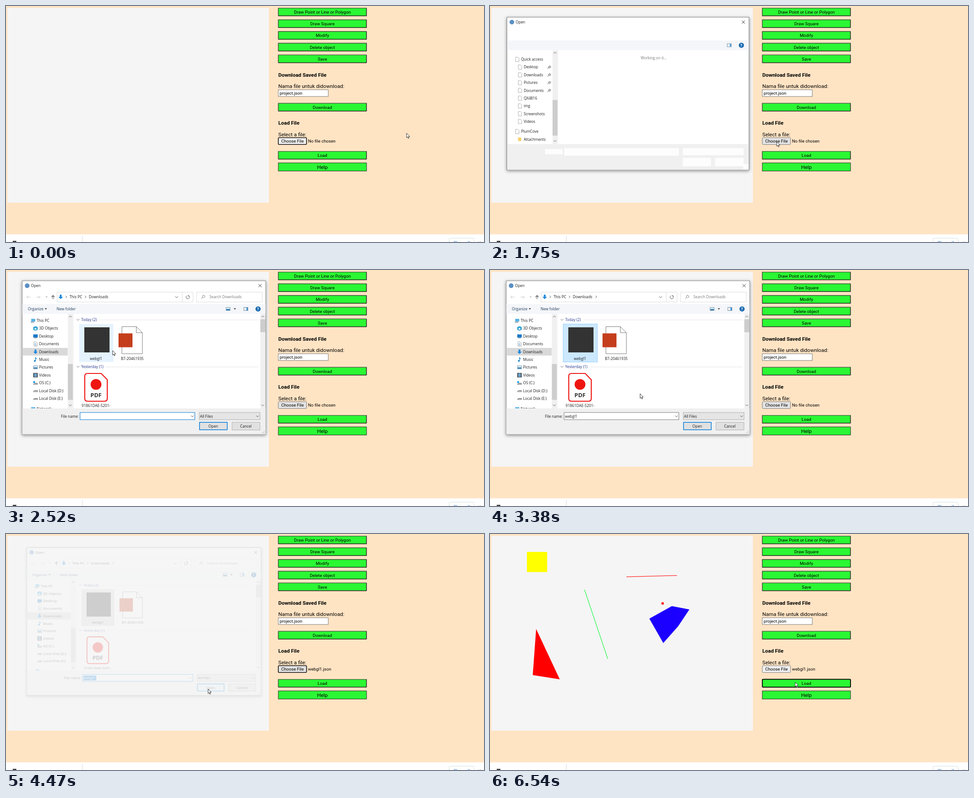
Recreate the animation shown at these times as an HTML page. Size 1062 by 527 pixels, loop 6.77 s.

```html
<!DOCTYPE html>
<html lang="en">
<head>
<meta charset="utf-8">
<title>Load a saved drawing</title>
<style>
  html, body { margin: 0; width: 100%; height: 100%; overflow: hidden; background: #ffe4c4; }
  svg { display: block; width: 1062px; height: 527px; }
  text { font: 9.64px Roboto, sans-serif; white-space: pre; }
  .big { font-size: 11.6px; }
  .head { font-size: 11.5px; font-weight: 700; }
  #dialog text { font: 8.3px "Open Sans", sans-serif; fill: #1c1c1c; }
  #dialog .group { fill: #1e3287; }
  #dialog .tool { fill: #1e395b; }
  #dialog .dim { fill: #777; }
  #dialog .pdf { font-size: 13px; font-weight: 700; fill: #333; }
  #dialog .help { font-size: 9px; font-weight: 700; fill: #fff; }
  .mid { text-anchor: middle; }
</style>
</head>
<body>
<svg id="stage" viewBox="0 0 1062 527"></svg>
<script>
const LOOP = 6770;
const rect = (x, y, w, h, fill, extra = '') =>
  `<rect x="${x}" y="${y}" width="${w}" height="${h}" fill="${fill}" ${extra}/>`;
const box = (x, y, w, h, fill, stroke, extra = '') =>
  rect(x + .5, y + .5, w - 1, h - 1, fill, `stroke="${stroke}" ${extra}`);
const text = (x, y, s, cls = '', extra = '') => `<text x="${x}" y="${y}" class="${cls}" ${extra}>${s}</text>`;
const line = (d, stroke, w = 1, fill = 'none') =>
  `<path d="${d}" fill="${fill}" stroke="${stroke}" stroke-width="${w}"/>`;
const shape = (points, fill) => `<polygon points="${points}" fill="${fill}"/>`;
const disc = (x, y, r, fill) => `<circle cx="${x}" cy="${y}" r="${r}" fill="${fill}"/>`;
const group = (id, body, extra = '') => `<g id="${id}" ${extra}>${body}</g>`;
const chevron = (x, y, dir = 'down', color = '#555') => line({
  down: `M${x - 3} ${y - 1.5}l3 3l3-3`, up: `M${x - 3} ${y + 1.5}l3-3l3 3`, right: `M${x - 1.5} ${y - 2.5}l2.5 2.5l-2.5 2.5`
}[dir], color);
const caret = (x, y, color = '#333') => shape(`${x - 2.5},${y - 1} ${x + 2.5},${y - 1} ${x},${y + 2}`, color);
const downArrow = (x, y) =>
  shape(`${x - 2},${y - 5} ${x + 2},${y - 5} ${x + 2},${y} ${x + 5},${y} ${x},${y + 5} ${x - 5},${y} ${x - 2},${y}`, '#1e88dd');
const page = (x, y) => line(`M${x - 3.5} ${y - 5}h5l2.5 2.5v7.5h-7.5z`, '#999', .8, '#fff');

// Web page
const greenButton = (y, label) => rect(604.5, y, 197, 18.6, '#1a1a1a')
  + line(`M605.1 ${y + 17.6}V${y + .6}H800.5`, '#4f5f4c', 1.2)
  + rect(605.7, y + 1.2, 194.4, 16, '#2bf733') + text(703, y + 13, label, 'mid');

function webPage() {
  const labels = ['Draw Point or Line or Polygon', 'Draw Square', 'Modify', 'Delete object', 'Save'];
  return rect(0, 0, 1062, 527, '#ffe4c4') + rect(3, 4, 581, 435, '#f5f5f5')
    + labels.map((s, i) => greenButton(4 + i * 26.2, s)).join('')
    + text(605, 158, 'Download Saved File', 'head')
    + text(605, 183.4, 'Nama file untuk didownload:', 'big')
    + box(604.5, 186.5, 112, 16, '#fff', '#767676') + text(608, 198, 'project.json')
    + greenButton(216.7, 'Download')
    + text(605, 265.3, 'Load File', 'head') + text(605, 290.8, 'Select a file:', 'big')
    + rect(605, 294, 62.7, 15.3, '#efefef', 'id="choose" rx="1.5"')
    + text(636.5, 304.8, 'Choose File', 'mid') + text(671, 304.8, '', '', 'id="chosen"')
    + greenButton(324, 'Load')
    + group('loadFocus', rect(605.2, 324.4, 195.8, 17.6, 'none', 'rx="2" stroke="#000" stroke-width="1.6"'))
    + box(604.5, 349.8, 197, 19.2, '#2bf735', '#222') + text(703, 363.8, 'Help', 'big mid')
    + rect(0, 510, 1062, 17, '#fff') + rect(169, 514, 1, 13, '#d5d7da') + rect(15, 524.5, 8, 8, '#333')
    + box(984, 518, 57, 20, '#fff', '#dadce0', 'rx="3"')
    + text(1012.5, 532.3, 'Show all', 'mid', 'fill="#1a73c8"') + line('M1050 525.5l5 5m0-5l-5 5', '#999');
}

const drawing = () => rect(82, 40, 45, 45, '#ff0') + rect(381, 152.5, 5, 5, '#f00')
  + line('M303 95.7L415.5 92.7', '#f22', 1.3) + line('M210 124.5L261.7 279', '#2bf74b', 1.3)
  + shape('404,161 443,168.5 418,206 385,243.5 354,189', '#1c00ff')
  + shape('102.5,212 155,324.5 95,315', '#f00');

// File dialog
const scrollbar = (x, thumbY, thumbH) => rect(x, 98, 11, 211, '#f0f0f0')
  + rect(x, thumbY, 11, thumbH, '#cdcdcd') + chevron(x + 5.5, 104, 'up') + chevron(x + 5.5, 302);

const frame = () => rect(35.5, 23.5, 542, 344, '#fff', 'filter="url(#shadow)"')
  + box(35.5, 23.5, 542, 344, '#fff', '#777')
  + disc(47, 35, 5.2, '#5b8fc4') + text(55.5, 38.4, 'Open') + line('M561 31.5l7 7m0-7l-7 7', '#333')
  + rect(36.5, 76, 540, 22, '#f4f6f9') + rect(36.5, 309, 540, 57.5, '#f0f0f0')
  + box(528, 83, 10, 8, '#fff', '#6a8aa8') + rect(534, 84, 3, 6, '#4b9bd8')
  + disc(560, 87, 5.8, '#1c6bb0') + text(560, 90.2, '?', 'help mid') + rect(149, 98, 1, 211, '#eee');

function waiting() {
  const names = ['Quick access', 'Desktop', 'Downloads', 'Pictures', 'Documents', 'QX4816', 'img', 'Screenshots', 'Videos', 'PlumCove', 'Attachments'];
  const rows = names.map((s, i) => {
    const indent = i % 9 ? 6 : 0, y = 118.7 + i * 17.45 + (i > 8 ? 5 : 0);
    const icon = i == 10 ? rect(61, y - 4, 7, 8, '#f5cf6b') : page(59 + indent, y);
    const pin = i > 0 && i < 5 ? line(`M127 ${y + 3.5}l3-3m-1.5-2l3.5 3.5m-2.5-3l2-2l2.5 2.5l-2 2`, '#777', 1.1) : '';
    return icon + pin + text(67.5 + indent, y + 3, s);
  }).join('');
  const blanks = [[121, 320, 39, 12], [164, 318, 256, 17], [429, 318, 136, 16], [429, 340, 63, 19], [501, 340, 64, 19], [564, 354, 12, 12]];
  return rows + scrollbar(138, 210, 80) + blanks.map(b => rect(...b, '#fdfdfd')).join('');
}

const drive = (x, y) => shape(`${x - 5},${y + 1} ${x - 2},${y - 1} ${x + 5},${y - 1} ${x + 5},${y + 3} ${x - 5},${y + 3}`, '#888')
  + rect(x - 4, y + 1, 8, 1, '#ddd');
const screen = (x, y) => rect(x - 5, y - 4, 10, 7, '#1678c8') + rect(x - 3, y + 3.5, 6, 1, '#567');
const computer = (x, y) => rect(x - 4, y - 4, 9, 6, '#58b2e6') + rect(x - 5, y + 2.5, 8, 2, '#8a98a5');
const picture = (x, y) => box(x - 5, y - 4, 10, 8, '#e6f3fc', '#7b98ad') + rect(x - 4, y, 8, 3, '#3a82b5');
const treeIcons = [
  computer,
  (x, y) => shape(`${x},${y - 5} ${x + 5},${y - 3} ${x + 5},${y + 3} ${x},${y + 5} ${x - 5},${y + 3} ${x - 5},${y - 3}`, '#2a9fd0') + rect(x - 2, y - 1, 4, 4, '#d9f1fa'),
  screen,
  (x, y) => page(x, y) + line(`M${x - 2} ${y - 1}h4m-4 2h4m-4 2h4`, '#4a90c8', .8),
  downArrow,
  (x, y) => disc(x - 1.5, y + 3, 2, '#1a86d0') + line(`M${x} ${y + 3}v-8q1 3 3 4`, '#1a86d0', 1.3),
  picture,
  (x, y) => rect(x - 5, y - 5, 10, 10, '#444') + rect(x - 3, y - 4, 6, 8, '#6ba3cc'),
  (x, y) => drive(x, y + 1) + rect(x - 5, y - 4, 4, 4, '#1a9be0'),
  drive, drive, computer
];

function loaded() {
  const names = ['This PC', '3D Objects', 'Desktop', 'Documents', 'Downloads', 'Music', 'Pictures', 'Videos', 'OS (C:)', 'Local Disk (D:)', 'Local Disk (E:)', 'Network'];
  const tree = names.map((s, i) => {
    const indent = i % 11 ? 5.5 : 0, y = 113 + i * 17.4 + (i > 10 ? 6 : 0);
    return treeIcons[i](60 + indent, y) + text(68 + indent, y + 3, s);
  }).join('');
  const nav = line('M54 60.5h-8l3-3m-3 3l3 3M68 60.5h8l-3-3m3 3l-3 3', '#c8c8c8') + caret(90, 60, '#bbb')
    + line('M104.5 65v-8l-3.5 3.5m3.5-3.5l3.5 3.5', '#555', 1.2)
    + box(113, 49, 303, 23, '#fff', '#dcdcdc') + rect(391, 50, 1, 21, '#dcdcdc') + downArrow(121.5, 60)
    + chevron(134, 60, 'right') + text(141, 63, 'This PC') + chevron(177, 60, 'right') + text(184, 63, 'Downloads')
    + group('crumb', chevron(236, 60, 'right')) + chevron(379, 60.5)
    + line('M401.5 57.7a3.7 3.7 0 1 0 4.5 0M406.5 60v-3h-3', '#555')
    + box(423, 49, 147, 23, '#fff', '#dcdcdc') + line('M434 64l3-3a2.8 2.8 0 1 1 1.3 .8', '#777')
    + text(452, 63, 'Search Downloads', 'dim');
  const toolbar = text(48.5, 90, 'Organize', 'tool') + caret(88.5, 86.5) + text(112.5, 90, 'New folder', 'tool')
    + picture(493.5, 87) + caret(508.5, 86.5);
  const footer = text(122, 329.5, 'File name:') + box(164, 317.7, 256, 17, '#fff', '#0078d7', 'id="field"')
    + rect(166.5, 321, 30, 11, '#0078d7', 'id="marked"') + text(166.5, 329.5, 'webgl1', '', 'id="fileName"') + chevron(414, 326.5)
    + box(429, 317.7, 136, 17, '#e5e5e5', '#adadad') + text(431, 329.5, 'All Files') + chevron(559, 326.5)
    + rect(430, 340.2, 61.5, 16.5, '#e1e1e1', 'id="open" stroke="#0078d7" stroke-width="1.5"') + text(460.5, 351.6, 'Open', 'mid')
    + box(501.7, 339.7, 63, 18, '#e1e1e1', '#adadad') + text(533, 351.6, 'Cancel', 'mid')
    + [0, 1, 2].map(i => rect(573 - i * 2, 363, 1, 1, '#999') + rect(573, 363 - i * 2, 1, 1, '#999')).join('');
  return nav + toolbar + footer + rect(36.5, 174, 100.5, 17, '#d9d9d9')
    + `<g clip-path="url(#panes)">${tree}</g>` + scrollbar(137.5, 210, 80);
}

const section = (y, label, lineX) => chevron(160, y, 'down', '#667') + text(167, y + 3, label, 'group') + rect(lineX, y, 561 - lineX, 1, '#e4e4e4');
const files = () => section(111, 'Today (2)', 208) + section(216, 'Yesterday (1)', 221)
  + box(162, 120, 77, 86, 'none', 'none', 'id="item"')
  + rect(174, 128, 56, 56, '#333') + text(200, 200.6, 'webgl1', 'mid')
  + line('M257.5 126.5h32l13.5 13.5v47h-45.5zM289.5 126.5v13.5h13.5', '#777', 1, '#fff')
  + rect(250, 141.5, 31, 31, '#c43e1c') + text(280.5, 200.6, 'B7-20461935', 'mid')
  + line('M181 231h30.5l13.5 14v42q0 6-6 6h-38q-6 0-6-6v-50q0-6 6-6z', '#ee1511', 2.2, '#fff')
  + disc(200, 255.5, 12, '#ee1511') + text(200, 284, 'PDF', 'pdf mid') + text(200, 305.7, '91861DAE-5201-', 'mid')
  + scrollbar(565, 110, 29);

const stage = document.getElementById('stage');
stage.innerHTML = `<defs><clipPath id="panes"><rect x="36.5" y="98" width="540" height="211"/></clipPath>
  <filter id="shadow" x="-5%" y="-5%" width="110%" height="112%"><feDropShadow dx="0" dy="2" stdDeviation="3.5" flood-opacity=".45"/></filter></defs>`
  + webPage() + group('drawing', drawing())
  + group('dialog', frame() + group('waiting', waiting()) + group('loaded', loaded())
    + group('working', text(364, 118.5, 'Working on it...', 'dim mid')) + group('files', files(), 'clip-path="url(#panes)"'))
  + group('cursor', line('M0 0V10.2L2.3 8.1L3.9 11.8L5.5 11.1L3.9 7.5H7.1Z', '#222', .9, '#fff'));

const el = {};
stage.querySelectorAll('[id]').forEach(node => el[node.id] = node);
const show = (id, on) => el[id].style.display = on ? '' : 'none';
const set = (id, attrs) => Object.entries(attrs).forEach(([k, v]) => el[id].setAttribute(k, v));
const clamp = v => Math.max(0, Math.min(1, v));

// Pointer stops as [ms, x, y]; a repeated place is a rest
const path = [
  [0, 890, 284], [40, 890, 284], [740, 611, 303], [930, 611, 303], [1300, 637, 303], [1880, 637, 303],
  [2300, 290, 206], [2520, 237, 180], [2830, 218, 164], [3110, 218, 164], [3380, 333, 276],
  [3750, 552, 345], [3800, 552, 345], [4080, 449, 346], [4790, 449, 346], [5150, 622, 299],
  [5440, 678, 331], [LOOP, 678, 331]
];
function speed(i, axis) {
  const a = path[i - 1], b = path[i], c = path[i + 1];
  if (!a || !c || a[1] == b[1] || b[1] == c[1]) return 0;
  return (c[axis] - a[axis]) / (c[0] - a[0]);
}
function pointer(t) {
  const i = path.findIndex(p => p[0] > t) - 1, a = path[i], b = path[i + 1];
  const span = b[0] - a[0], u = (t - a[0]) / span, v = 1 - u;
  return [1, 2].map(k => a[k] * v * v * (1 + 2 * u) + b[k] * u * u * (3 - 2 * u)
    + span * u * v * (speed(i, k) * v - speed(i + 1, k) * u));
}

function render(t) {
  const [x, y] = pointer(t);
  const over = (l, top, r, bottom) => x >= l && x <= r && y >= top && y <= bottom;
  set('cursor', { transform: `translate(${x} ${y})` });

  const focused = t < 1500 || (t >= 4290 && t < 5610);
  set('choose', {
    fill: t > 700 && t < 4830 ? '#e3e3e3' : '#efefef',
    stroke: focused ? '#101010' : '#767676', 'stroke-width': focused ? 1.6 : 1
  });
  el.chosen.textContent = t < 4290 ? 'No file chosen' : 'webgl1.json';
  show('loadFocus', t >= 5610);
  show('drawing', t >= 5760);

  const opening = clamp((t - 1560) / 270), closing = clamp((t - 4262) / 250);
  const scale = 1 - .07 * (1 - opening) ** 2 - .045 * closing;
  show('dialog', opening > 0 && closing < 1);
  set('dialog', {
    opacity: clamp(opening * 1.5) * (1 - closing) ** .9,
    transform: `translate(306.5 195.5) scale(${scale}) translate(-306.5 -195.5)`
  });
  show('waiting', t < 1900);
  show('loaded', t >= 1900);
  show('working', t < 2380);
  show('files', t >= 2380);
  show('crumb', t >= 2830);

  const picked = t >= 2980, confirming = t >= 3990;
  const hover = over(162, 120, 239, 206);
  set('item', {
    fill: confirming ? '#d9d9d9' : picked ? '#cce8ff' : hover ? '#e5f3ff' : 'none',
    stroke: picked && !confirming ? '#99d1ff' : 'none'
  });
  set('field', { stroke: picked && !confirming ? '#7a7a7a' : '#0078d7' });
  show('fileName', picked);
  show('marked', confirming);
  el.fileName.style.fill = confirming ? '#fff' : '';
  set('open', { fill: over(429, 340, 492, 358) ? '#e5f1fb' : '#e1e1e1' });
}

const start = performance.now();
(function tick() {
  render((performance.now() - start) % LOOP);
  requestAnimationFrame(tick);
})();
</script>
</body>
</html>
```
